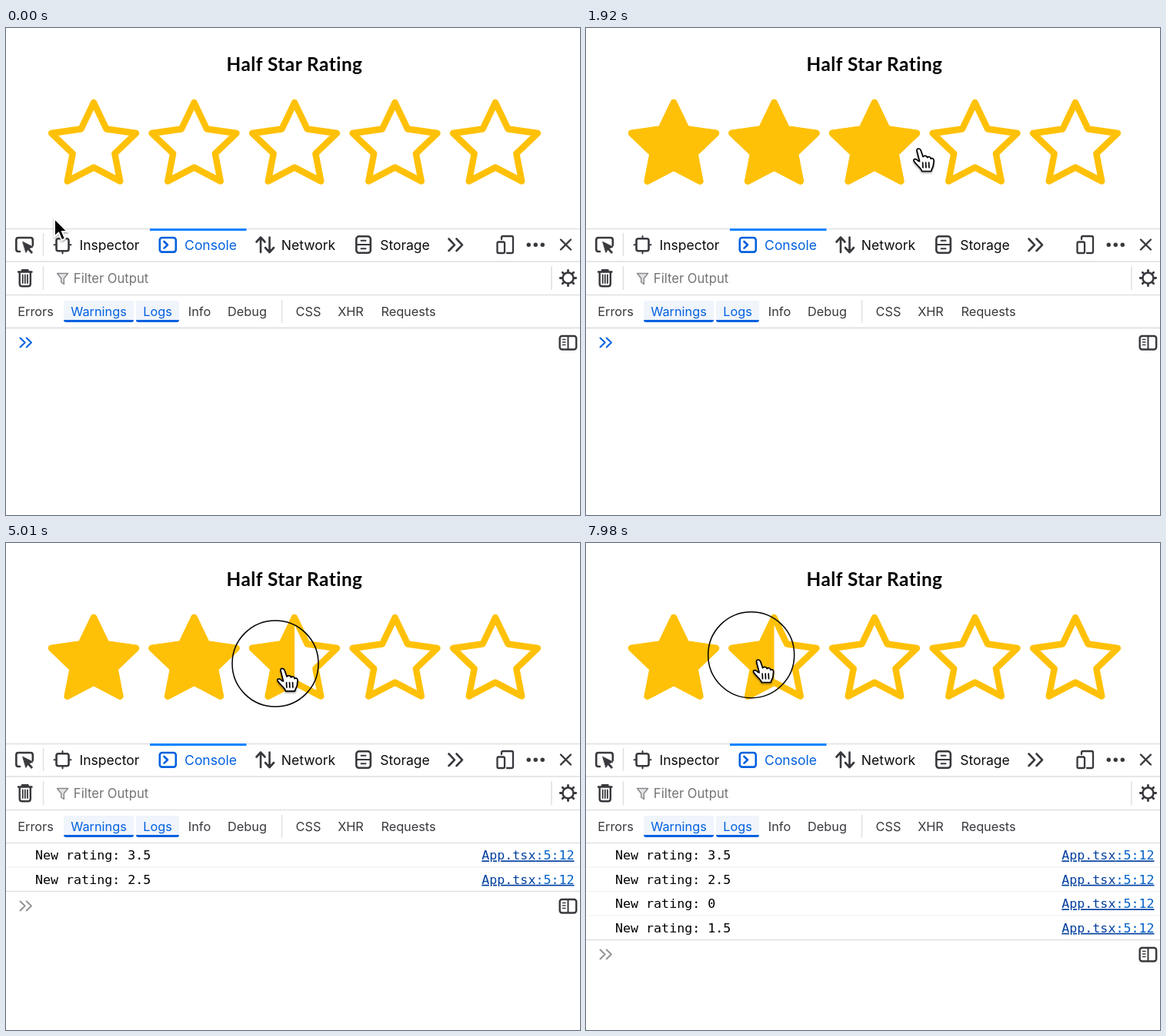
An HTML page that plays this animation: 746 by 634 pixels, repeating every 8 s.

```html
<!DOCTYPE html>
<html lang="en">
<head>
<meta charset="utf-8">
<title>Half Star Rating</title>
<style>
html, body { margin: 0; width: 100%; height: 100%; overflow: hidden; background: #fff; }
svg { display: block; width: 100vw; height: 100vh; }
text { font-family: Inter, "Open Sans", sans-serif; text-anchor: middle; }
.title { font: 700 24.3px Lato, sans-serif; letter-spacing: .5px; }
.tabs text { font-size: 17.5px; fill: #0c0c0d; }
.tabs .on { fill: #0060df; }
.chips text { font-size: 16.3px; fill: #38383d; }
.chips .on { fill: #0060df; }
.log text { font: 16.65px "DejaVu Sans Mono", monospace; text-anchor: start; white-space: pre; }
.log .link { text-anchor: end; fill: #003e9e; text-decoration: underline; }
.log .pos { fill: #0060c8; }
.icon { fill: none; stroke: #38383d; stroke-width: 2.6; stroke-linecap: round; stroke-linejoin: round; }
.thin { stroke-width: 1.5; }
.line { stroke: #e0e0e2; stroke-width: 1.5; }
</style>
</head>
<body>
<svg viewBox="0 0 746 634">
  <defs>
    <path id="star" d="M0 97 L16.5 131.5 L55 137 L27.3 163.5 L34.3 199.5 L0 181.5 L-34.3 199.5 L-27.3 163.5 L-55 137 L-16.5 131.5Z"/>
    <clipPath id="cut"><rect id="cutRect" x="0" y="80" width="0" height="140"/></clipPath>
    <filter id="shade" x="-50%" y="-50%" width="200%" height="200%">
      <feDropShadow dx="0" dy="1.5" stdDeviation="1.3" flood-opacity=".4"/>
    </filter>
  </defs>
  <rect width="746" height="634" fill="#fff"/>
  <text class="title" x="375" y="56">Half Star Rating</text>
  <g stroke="#ffc107" stroke-width="8.4" stroke-linejoin="round">
    <g id="empty" fill="none"></g>
    <g id="full" fill="#ffc107" clip-path="url(#cut)"></g>
  </g>

  <path class="line" d="M0 261.5H746 M0 304H746 M0 347.5H746 M0 390.5H746 M48.5 267V297 M48.5 310V341 M709 310V341 M358.5 354V384"/>
  <rect x="187" y="261" width="125.5" height="3" fill="#0a84ff"/>

  <g class="tabs">
    <text x="134.5" y="288.5">Inspector</text>
    <text class="on" x="266" y="288.5">Console</text>
    <text x="393" y="288.5">Network</text>
    <text x="518.5" y="288.5">Storage</text>
  </g>
  <g class="icon">
    <path d="M18 291H16Q13.3 291 13.3 288V276Q13.3 273 16 273H32Q34.8 273 34.8 276V283"/>
    <path d="M22 278.5L35 285L30 287L34.5 292L33 293.5L28.5 288.5L26 292Z" fill="#38383d" stroke-width="1"/>
    <rect x="65.5" y="274.3" width="16" height="16" rx="2.5"/>
    <path d="M73.5 271V274 M73.5 290V293.5 M62.5 282.3H65 M82 282.3H84.5" stroke-width="2"/>
    <g stroke="#0060df"><rect x="199.8" y="273" width="21" height="18.6" rx="3"/><path d="M205.5 278L210 282.3L205.5 286.6"/></g>
    <path d="M331 292V273 M325.5 278.5L331 272.5L336.5 278.5 M342.5 272.5V291.5 M337 286L342.5 292L348 286"/>
    <rect x="455.3" y="271.3" width="18.5" height="21.5" rx="3.5"/>
    <path d="M456 282H473 M461.5 276.7H467.5 M461.5 287.3H467.5" stroke-width="2"/>
    <path d="M575.5 274.5L583 282.3L575.5 290 M585.5 274.5L593 282.3L585.5 290"/>
    <path d="M644 275V273Q644 271 646 271H657Q659 271 659 273V291Q659 293 657 293H651" stroke-width="2.3"/>
    <rect x="638.5" y="278.5" width="9.5" height="14.5" rx="1.8" stroke-width="2.3"/>
    <path d="M721 275.5L734 288.5 M734 275.5L721 288.5" stroke-width="2.4"/>
    <path d="M16 317.5H33.5 M21 317V315.3H28.5V317 M17.7 318V333Q17.7 336.3 21 336.3H28.5Q31.8 336.3 31.8 333V318" stroke-width="2.4"/>
    <path d="M21.7 321.5V332 M24.8 321.5V332 M27.9 321.5V332" stroke-width="1.8"/>
    <path class="thin" d="M66.5 319.5H80.5L75.3 326V333.5L71.7 331V326Z" stroke="#8a8a8e" fill="#e4e4e6"/>
    <circle cx="730.5" cy="325.5" r="7" stroke-width="2.5"/>
    <g id="teeth" stroke-width="2.8"></g>
  </g>
  <g fill="#38383d"><circle cx="679.3" cy="282.3" r="2.7"/><circle cx="688.3" cy="282.3" r="2.7"/><circle cx="697.3" cy="282.3" r="2.7"/></g>
  <text x="136.5" y="331.5" font-size="16.6" fill="#737373">Filter Output</text>

  <g class="chips">
    <path d="M75 383V358Q75 355 78 355H163Q166 355 166 358V383Z M169 383V358Q169 355 172 355H222Q225 355 225 358V383Z" fill="#f0f4fb"/>
    <path d="M75 380H166Q166 383 163 383H78Q75 383 75 380Z M169 380H225Q225 383 222 383H172Q169 383 169 380Z" fill="#0060df"/>
    <text x="38.5" y="375">Errors</text>
    <text class="on" x="120.5" y="375">Warnings</text>
    <text class="on" x="197" y="375">Logs</text>
    <text x="251.5" y="375">Info</text>
    <text x="313.5" y="375">Debug</text>
    <text x="393" y="375">CSS</text>
    <text x="448" y="375">XHR</text>
    <text x="523" y="375">Requests</text>
  </g>

  <g id="logs" class="log"></g>
  <g id="prompt">
    <path class="line" d="M0 390.5H746"/>
    <path id="chevrons" class="icon" d="M18.5 403.5L24.7 409.5L18.5 415.5 M26.7 403.5L32.9 409.5L26.7 415.5" style="stroke-width:2"/>
    <g class="icon">
      <rect x="719.7" y="401" width="21.5" height="17.5" rx="3" stroke-width="2.4"/>
      <path d="M730.5 401.5V418" stroke-width="2"/>
      <path class="thin" d="M723.5 405.5H727 M723.5 409H727 M723.5 412.5H727"/>
    </g>
  </g>
  <path id="caret" d="M48.7 400V420" stroke="#0c0c0d" stroke-width="1.5"/>

  <circle id="ring" r="56" fill="none" stroke="#000" stroke-width="1.5"/>
  <g id="cursor" filter="url(#shade)">
    <path id="arrow" d="M0 0V23.5L5.4 18.5L9.3 28L13.8 26.2L9.8 16.8H16.5Z" fill="#000" stroke="#fff" stroke-width="1.8"/>
    <g id="hand" stroke="#000" stroke-width="1.7" stroke-linejoin="round" stroke-linecap="round">
      <path d="M-1 1.5C-2 -2 2.5 -3 4 .5L7 9C8 7 12 7 12.5 10C14 8 17 9 17 11.5C19 10 21 11.5 21 14L20.3 20C19.8 24 18 24 17.5 27.8H5.5C5 24 -1 20.5 -5 14.5C-6 11 -2 11 .8 14.5L2.5 15Z" fill="#fff"/>
      <path d="M6.5 16.5L6.8 23 M10.5 16.5L10.8 23 M14.5 16.5L14.8 23" fill="none"/>
    </g>
  </g>
</svg>
<script>
const LOOP = 8000, ROW = 31.5, STEP = 130.5, LEFT = 48.75;
const CLICKS = [2520, 3990, 5010, 6780, 7920];
const RATINGS = ['3.5', '2.5', '0', '1.5'];
const RING = 210, LOG_DELAY = 120, BLINK = 500, FOCUS_END = 2550;
const RESET = [CLICKS[2] + LOG_DELAY, 6000];

// pointer path: time, x, y
const PATH = [
  [30, 63, 248], [210, 150, 186], [510, 498, 150], [810, 498, 150],
  [1050, 280, 150], [1200, 314, 152], [1530, 426, 159], [1830, 426, 159],
  [1920, 431, 158.7], [2310, 524, 155], [3390, 524, 155], [3570, 404.5, 159],
  [3780, 358, 165], [6000, 358, 165], [6640, 222.7, 153.7]
];

const $ = id => document.getElementById(id);
const show = (el, on) => el.setAttribute('display', on ? 'inline' : 'none');
const move = (el, x, y) => el.setAttribute('transform', `translate(${x} ${y})`);

for (let i = 0; i < 5; i++) {
  const star = `<use href="#star" x="${LEFT + STEP * (i + .5)}"/>`;
  $('empty').innerHTML += star;
  $('full').innerHTML += star;
}
for (let i = 0; i < 8; i++) {
  $('teeth').innerHTML += `<path d="M730.5 317.5V315.3" transform="rotate(${i * 45} 730.5 325.5)"/>`;
}
$('logs').innerHTML = RATINGS.map((r, i) => `<g transform="translate(0 ${i * ROW})">
  <path d="M0 422H746" stroke="#f0f0f2" stroke-width="1.2"/>
  <text x="38" y="412.3">New rating: ${r}</text>
  <text class="link" x="738.5" y="412.3">App.tsx<tspan class="pos">:5:12</tspan></text></g>`).join('');
const rows = [...$('logs').children];

const slope = (i, k) => i < 0 || i > PATH.length - 2 ? 0
  : (PATH[i + 1][k] - PATH[i][k]) / (PATH[i + 1][0] - PATH[i][0]);

// tangent that never overshoots: rests at turning points
function tangent(i, k) {
  const a = slope(i - 1, k), b = slope(i, k);
  return a * b <= 0 ? 0 : 2 * a * b / (a + b);
}

function along(t, k) {
  const last = PATH.length - 1;
  if (t <= PATH[0][0]) return PATH[0][k];
  if (t >= PATH[last][0]) return PATH[last][k];
  const i = PATH.findIndex(p => p[0] > t) - 1;
  const h = PATH[i + 1][0] - PATH[i][0], u = (t - PATH[i][0]) / h, v = 1 - u;
  return PATH[i][k] * v * v * (1 + 2 * u) + PATH[i + 1][k] * u * u * (3 - 2 * u)
    + h * u * v * (tangent(i, k) * v - tangent(i + 1, k) * u);
}

function draw(t) {
  const x = along(t, 1), y = along(t, 2);
  const over = y < 208;
  const cleared = t >= RESET[0] && t <= RESET[1];
  const rating = over && !cleared ? Math.round((x + 5 - LEFT) / STEP * 2) / 2 : 0;
  $('cutRect').setAttribute('width', rating ? LEFT + STEP * rating : 0);

  move($('cursor'), x, y);
  show($('arrow'), !over);
  show($('hand'), over);
  move($('ring'), x - 8, y - 8);
  show($('ring'), CLICKS.some(c => t >= c && t < c + RING));

  const count = RATINGS.filter((r, i) => t >= CLICKS[i] + LOG_DELAY).length;
  rows.forEach((row, i) => show(row, i < count));
  move($('prompt'), 0, count * ROW);
  const focused = t < FOCUS_END;
  $('chevrons').style.stroke = focused ? '#0060df' : '#939395';
  show($('caret'), focused && t > 315 && Math.floor((t - 315) / BLINK) % 2 === 0);
}

const start = performance.now();
function tick() {
  draw((performance.now() - start) % LOOP);
  requestAnimationFrame(tick);
}
draw(0);
requestAnimationFrame(tick);
</script>
</body>
</html>
```
